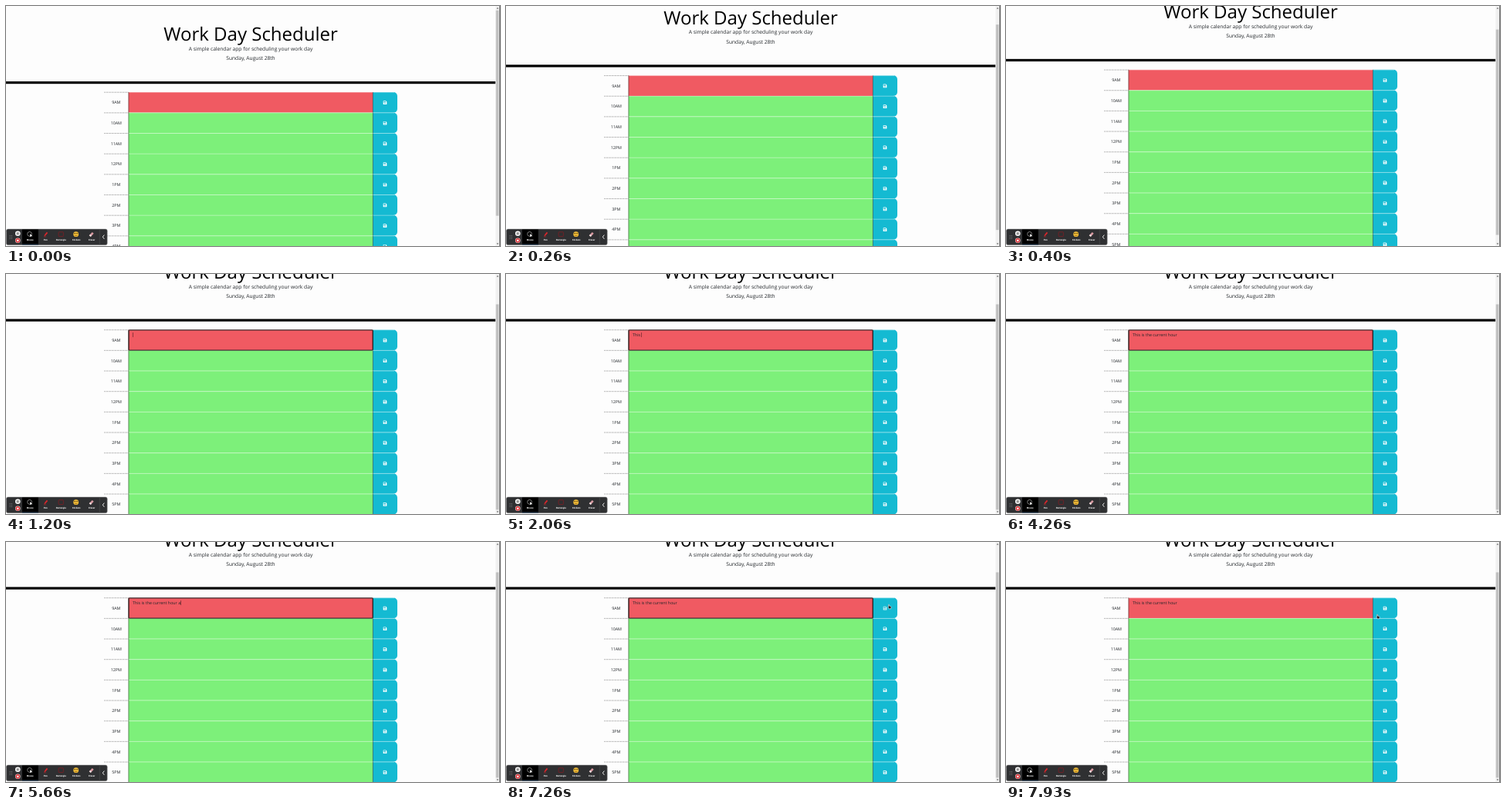
Write an HTML page that moves like this. It is 640 by 312 pixels and loops after 8 s.

```html
<!DOCTYPE html>
<html lang="en">
<head>
<meta charset="utf-8">
<title>Work Day Scheduler</title>
<style>
  html, body { margin: 0; width: 100%; height: 100%; overflow: hidden; background: #fdfdfd; }
  svg { display: block; width: 100vw; height: 100vh; }
  text { font-family: "Open Sans", sans-serif; fill: #212529; text-rendering: geometricPrecision; white-space: pre; }
  .mid { text-anchor: middle; }
  .title { font-size: 24px; fill: #000; }
  .lead { font-size: 6.667px; }
  .cell { font-size: 5.333px; }
  .tool { font: 700 2.9px Roboto, sans-serif; fill: #fff; }
</style>
</head>
<body>
<svg viewBox="0 0 640 312" preserveAspectRatio="none">
  <defs>
    <g id="disk">
      <path fill="#fff" fill-rule="evenodd" d="M-1.83-2.33H1.1L2.33-1.1V1.83a.5.5 0 0 1-.5.5H-1.83a.5.5 0 0 1-.5-.5V-1.83a.5.5 0 0 1 .5-.5ZM-1.65-1.65V-.3H1V-1.65ZM0 .3a.67.67 0 1 0 .01 0Z"/>
    </g>
  </defs>
  <g id="page">
    <rect width="634.3" height="98" fill="#fdfdfd"/>
    <text class="title mid" x="317" y="45.2">Work Day Scheduler</text>
    <text class="lead mid" x="317" y="58.1">A simple calendar app for scheduling your work day</text>
    <text class="lead mid" x="317" y="70.2">Sunday, August 28th</text>
    <rect y="98" width="634.2" height="3.2"/>
    <g id="rows"></g>
    <text class="cell" id="note" x="164" y="120.2"></text>
    <rect id="caret" y="115.6" width=".4" height="6" fill="#000"/>
    <rect id="focus" x="159" y="112.4" width="316.2" height="26.2" rx=".8" fill="none" stroke="#101010"/>
  </g>
  <g id="scrollbar">
    <rect x="634.3" width="5.7" height="312" fill="#f1f1f1"/>
    <rect id="thumb" x="634.7" y="5.67" width="3.7" height="267" fill="#c1c1c1"/>
    <path d="M635.5 3.6h2.8l-1.4-1.7ZM635.5 308.4h2.8l-1.4 1.7Z" fill="#505050"/>
    <rect x="639.2" width=".8" height="312" fill="#555"/>
  </g>
  <g id="toolbar">
    <rect x=".4" y="290" width="130.8" height="20.7" rx="2.2" fill="#2f3032" stroke="#8a8a8a" stroke-width=".5"/>
    <rect x="21" y="290.5" width="20.8" height="20" fill="#000"/>
    <rect x="21" y="309.7" width="20.8" height=".8" fill="#4a6a8c"/>
    <path d="M5.2 298v5M7.4 298v5" stroke="#999" stroke-width=".8" stroke-dasharray=".9 1.1"/>
    <circle cx="15.3" cy="295.8" r="3.3" fill="#fff"/>
    <path d="M14.4 294.2v3.2M16.2 294.2v3.2" stroke="#222" stroke-width=".8"/>
    <circle cx="15.3" cy="304.8" r="3.3" fill="#f5d5d5"/>
    <circle cx="15.3" cy="304.8" r="2.8" fill="#d93036"/>
    <rect x="14.2" y="303.7" width="2.2" height="2.2" fill="#fff"/>
    <circle cx="30.6" cy="296.4" r="2.9" fill="none" stroke="#ccc" stroke-width=".6"/>
    <path d="M31 296l3.4 3.2-1.8.1-1.2 1.3Z" fill="#fff"/>
    <path d="M49.3 299.4l.6-2 2.9-3.6 1.4 1.1-3 3.6Z" fill="#d9262c"/>
    <path d="M49 299.9h3.2" stroke="#d9262c" stroke-width=".5"/>
    <rect x="68.1" y="293.8" width="6.2" height="5.8" rx=".6" fill="none" stroke="#9c1820" stroke-width=".6"/>
    <circle cx="90.7" cy="296.7" r="3.4" fill="#f4bf38"/>
    <path d="M88.2 295.7h2.2M91.2 295.7h2.2" stroke="#3b2a10" stroke-width=".8"/>
    <path d="M89 298.1q1.7 1.4 3.4 0" fill="none" stroke="#6b3d10" stroke-width=".6"/>
    <path d="M107.7 298.2l4-4.1 2 1.6-4 4.2Z" fill="#d99aa2"/>
    <path d="M107.7 298.2l1.3-1.3 2 1.7-1.3 1.3Z" fill="#f3e3e3"/>
    <path d="M121.3 290.5v20" stroke="#555" stroke-width=".5"/>
    <path d="M127.3 297.6l-2 2.6 2 2.6" fill="none" stroke="#fff" stroke-width=".9"/>
  </g>
  <g id="pointer" stroke="#fff" stroke-width=".5" stroke-linejoin="round">
    <path id="arrow" d="M0 0v5.2l1.2-1.1.8 1.8.9-.4-.8-1.7h1.7Z" fill="#111"/>
    <path id="hand" d="M-.5.3q.5-.6 1 0v1.8l2.2.6q.5.2.4.8l-.5 2.3H.3L-1.3 3.6q.1-.7.8-.3Z" fill="#222"/>
  </g>
</svg>
<script>
const $ = id => document.getElementById(id);
const LOOP = 8000, STEP = 200 / 3, MAX_SCROLL = 39.5;
const NOTE = 'This is the current hour a';
const ROW_TOP = 112, ROW_H = 80 / 3;

// Key presses add one character each; the last two are removed again.
const KEYS = [1660, 1730, 1860, 1930, 2000, 2130, 2200, 2260, 2400, 2460,
  2600, 2660, 2730, 2800, 2860, 2930, 3060, 3200, 3330, 3460,
  3600, 3660, 3730, 3800, 5530, 5660];
const ERASES = [5930, 6060];
const FOCUS = [1130, 7400];
const CARET = [[1130, 1], [4260, 0], [4800, 1], [5330, 0], [5530, 1], [6730, 0]];
const PATH = [[6930, 470, 84], [7060, 557, 76], [7200, 503, 81], [7260, 496, 81],
  [7460, 496, 81], [7930, 481, 94]];

const HOURS = ['9AM', '10AM', '11AM', '12PM', '1PM', '2PM', '3PM', '4PM', '5PM'];
$('rows').innerHTML = HOURS.map((hour, i) => {
  const y = ROW_TOP + i * ROW_H, b = y + ROW_H;
  return `<path d="M127 ${y + .2}H158.7" stroke="#222" stroke-width=".4" stroke-dasharray=".9 .5"/>
    <text class="cell mid" x="142.8" y="${y + 15.4}">${hour}</text>
    <rect x="158.7" y="${y}" width="316.6" height="${ROW_H}" fill="${i ? '#7df07a' : '#f05a62'}"/>
    <path d="M475.3 ${y}H502a5 5 0 0 1 5 5V${b - 5}a5 5 0 0 1-5 5H475.3Z" fill="#14bad2"/>
    <path d="M158.7 ${y + .2}H503" stroke="#fff" stroke-width=".4"/>
    <path d="M158.9 ${y}V${b}M475.4 ${y}V${b}" stroke="#111" stroke-width=".45"/>
    <use href="#disk" id="icon${i}" x="491" y="${y + 13.6}"/>`;
}).join('');

['Mouse', 'Pen', 'Rectangle', 'Stickers', 'Eraser'].forEach((name, i) => {
  $('toolbar').insertAdjacentHTML('beforeend',
    `<text class="tool mid" x="${31.2 + i * 20}" y="305.4">${name}</text>`);
});

const show = (id, on) => $(id).setAttribute('visibility', on ? 'visible' : 'hidden');
const count = (times, t) => times.filter(at => at <= t).length;

function along(path, t) {
  const i = path.findIndex(p => p[0] > t);
  if (i < 0) return path[path.length - 1].slice(1);
  if (i === 0) return path[0].slice(1);
  const [a, b] = [path[i - 1], path[i]], k = (t - a[0]) / (b[0] - a[0]);
  return [a[1] + (b[1] - a[1]) * k, a[2] + (b[2] - a[2]) * k];
}

function draw(t) {
  const frame = Math.floor((t + 7) / STEP);
  const tick = Math.floor(frame * STEP / 10 + .001) * 10;

  const p = Math.min(frame / 13, 1);
  const scroll = MAX_SCROLL * (1 - (1 - p) ** 2.16);
  $('page').setAttribute('transform', `translate(0 ${-scroll})`);
  $('thumb').setAttribute('y', 5.67 + scroll * .855);

  const note = $('note');
  const text = NOTE.slice(0, count(KEYS, tick) - count(ERASES, tick));
  if (note.textContent !== text) note.textContent = text;
  const focused = tick >= FOCUS[0] && tick < FOCUS[1];
  const blink = CARET.filter(c => c[0] <= tick).pop();
  show('focus', focused);
  show('caret', focused && blink && blink[1]);
  $('caret').setAttribute('x', 164.1 + (text ? note.getComputedTextLength() : 0));

  const moving = tick >= PATH[0][0];
  const [x, y] = along(PATH, tick);
  const onButton = x > 475 && x < 507 && y > 72 && y < 99;
  show('arrow', moving && !onButton);
  show('hand', moving && onButton);
  $('pointer').setAttribute('transform', `translate(${x} ${y})`);
  $('icon0').setAttribute('opacity', tick >= 7200 && tick < 7530 ? .75 : 1);
}

function loop() {
  draw(performance.now() % LOOP);
  requestAnimationFrame(loop);
}
loop();
</script>
</body>
</html>
```
